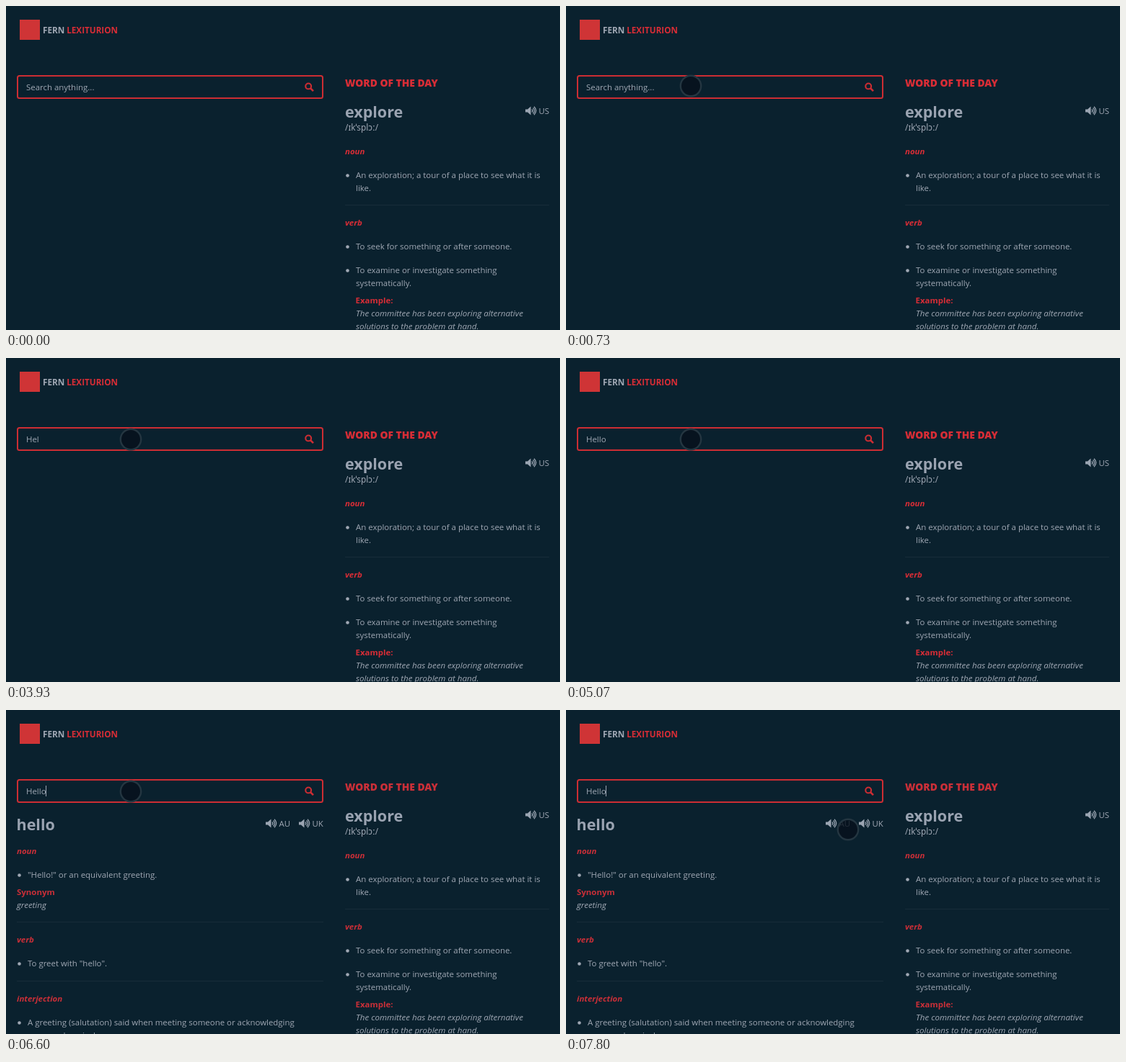
Write an HTML page that moves like this. It is 768 by 450 pixels and loops after 8000 ms.

```html
<!DOCTYPE html>
<html lang="en">
<head>
<meta charset="utf-8">
<title>Dictionary search</title>
<style>
  html, body { margin: 0; width: 100%; height: 100%; overflow: hidden; background: #0a212e; }
  svg { display: block; width: 768px; height: 450px; }
  text { font: 500 11.45px "Open Sans", "Noto Sans", sans-serif; fill: #a0a8b4; white-space: pre; }
  .big { font-size: 21.5px; font-weight: 700; fill: #9aa3b1; }
  .heading { font-size: 13.85px; font-weight: 800; }
  .bold, .part { font-weight: 700; }
  .part { font-style: italic; }
  .italic { font-style: italic; font-size: 11.6px; }
  .brand { font-size: 11.7px; font-weight: 700; }
  .ipa { font-family: "Noto Sans", "DejaVu Sans", sans-serif; font-size: 11.8px; font-weight: 400; }
  .red, .heading, .bold, .part { fill: var(--red, #d82d36); }
  .rule { stroke: #172c39; }
  .dot { fill: #a0a8b4; }
</style>
</head>
<body>
<svg viewBox="0 0 768 450">
  <defs>
    <g id="speaker">
      <path d="M0-2h3l4.5-4v12L3 2H0z" fill="#9ba5b2"/>
      <path d="M9-2q2 2 0 4M10.6-4q4 4 0 8M12-5.7q5.6 5.7 0 11.4" fill="none" stroke="#9ba5b2" stroke-width="1.3"/>
    </g>
  </defs>

  <rect x="19" y="19" width="28" height="28" fill="#cf3436"/>
  <text class="brand" x="51" y="38">FERN <tspan fill="#d82d36">LEXITURION</tspan></text>

  <g fill="none" stroke="#cd2d33">
    <rect x="16" y="97" width="423" height="31" rx="2.5" stroke-width="2"/>
    <circle cx="419.2" cy="111.4" r="3.9" stroke-width="2.1"/>
    <path d="M422 114.2l4 4" stroke-width="2.6"/>
  </g>
  <text id="query" x="28" y="117"></text>
  <rect id="caret" y="105" width="1" height="15" fill="#9ba5b2"/>

  <g id="wordOfDay"></g>
  <g id="results"></g>

  <g id="pointer">
    <circle r="14" fill="#06101b" fill-opacity=".8"/>
    <circle r="14.2" fill="none" stroke="#243641" stroke-width="2.4"/>
  </g>
  <path id="moveCursor" transform="translate(176 116)" stroke="#fff" stroke-width="4" paint-order="stroke"
    shape-rendering="crispEdges"
    d="M0-14l6 6h-4v6h6v-4l6 6-6 6v-4h-6v6h4l-6 6-6-6h4v-6h-6v4l-6-6 6-6v4h6v-6h-4z"/>
</svg>
<script>
const $ = id => document.getElementById(id);
const LOOP = 8000, STEP = 66, RESULTS_AT = 6400;

const label = (x, y, cls, str) => `<text x="${x}" y="${y}" class="${cls}">${str}</text>`;
const bullet = (x, y, str) => `<circle class="dot" cx="${x + 3.5}" cy="${y - 3.5}" r="2.3"/>` + label(x + 15, y, "", str);
const rule = (x1, x2, y) => `<path class="rule" d="M${x1} ${y}.5H${x2}"/>`;
const accent = (x, y, str) => `<use href="#speaker" x="${x}" y="${y}"/>` + label(x + 18.5, y + 4.5, "", str);

$("wordOfDay").innerHTML =
  label(470, 112, "heading", "WORD OF THE DAY") +
  label(470, 155, "big", "explore") + accent(720, 145.5, "US") +
  label(470, 173, "ipa", "/ɪkˈsplɔː/") +
  label(470, 206, "part", "noun") +
  bullet(470, 239, "An exploration; a tour of a place to see what it is") +
  label(485, 257, "", "like.") +
  rule(470, 753, 276) +
  label(470, 305, "part", "verb") +
  bullet(470, 338, "To seek for something or after someone.") +
  bullet(470, 371, "To examine or investigate something") +
  label(485, 389, "", "systematically.") +
  label(484.5, 413, "bold", "Example:") +
  label(485, 431, "italic", "The committee has been exploring alternative") +
  label(485, 449, "italic", "solutions to the problem at hand.");

$("results").innerHTML =
  label(14.5, 167, "big", "hello") + accent(360, 157.5, "AU") + accent(406, 157.5, "UK") +
  label(15, 200, "part", "noun") +
  bullet(15, 233, '"Hello!" or an equivalent greeting.') +
  label(15, 257, "bold", "Synonym") +
  label(15, 275, "italic", "greeting") +
  rule(15, 440, 294) +
  label(15, 323, "part", "verb") +
  bullet(15, 356, 'To greet with "hello".') +
  rule(15, 440, 376) +
  label(15, 405, "part", "interjection") +
  bullet(15, 438, "A greeting (salutation) said when meeting someone or acknowledging") +
  label(30, 456, "", "someone's arrival.");

const typedAt = [2270, 2800, 3400, 4130, 4530];
const caretOn = [[870, 1400], [1930, 3330], [3400, 3930], [4130, 5070], [5600, 6070], [6600, 7130], [7660, LOOP]];
const moveCursorOn = [[1870, 1930], [2270, 2330]];
const within = (t, spans) => spans.some(([from, to]) => t >= from && t < to);
const show = (id, on) => $(id).setAttribute("visibility", on ? "visible" : "hidden");
const progress = (t, start, steps) => Math.min(1, Math.floor((t - start) / STEP) / steps);

function pointerAt(t) {
  if (t < 730) {
    const rest = (1 - progress(t, 125, 6)) ** 1.6;
    return [173 - 148 * rest, 112 + 171 * rest];
  }
  if (t < 870) return [173, 111];
  if (t < 7470) return [173, 113];
  const u = progress(t, 7460 - STEP, 6);
  return [173 + 218 * (1 - (1 - u) ** 1.3), 113 + 53 * u ** 1.28];
}

function draw(t) {
  const typed = "Hello".slice(0, typedAt.filter(at => t >= at).length);
  const query = $("query");
  query.textContent = typed || "Search anything...";
  $("caret").setAttribute("x", Math.floor(28 + (typed ? query.getComputedTextLength() : 0)));
  show("caret", within(t, caretOn));

  const moving = within(t, moveCursorOn);
  show("moveCursor", moving);
  show("pointer", t >= 130 && !moving);
  $("pointer").setAttribute("transform", `translate(${pointerAt(t)})`);

  const found = t >= RESULTS_AT;
  show("results", found);
  document.body.style.setProperty("--red", found ? "#cb2f38" : "#d82d36");
}

const start = performance.now();
function tick() {
  draw((performance.now() - start) % LOOP);
  requestAnimationFrame(tick);
}
tick();
</script>
</body>
</html>
```
